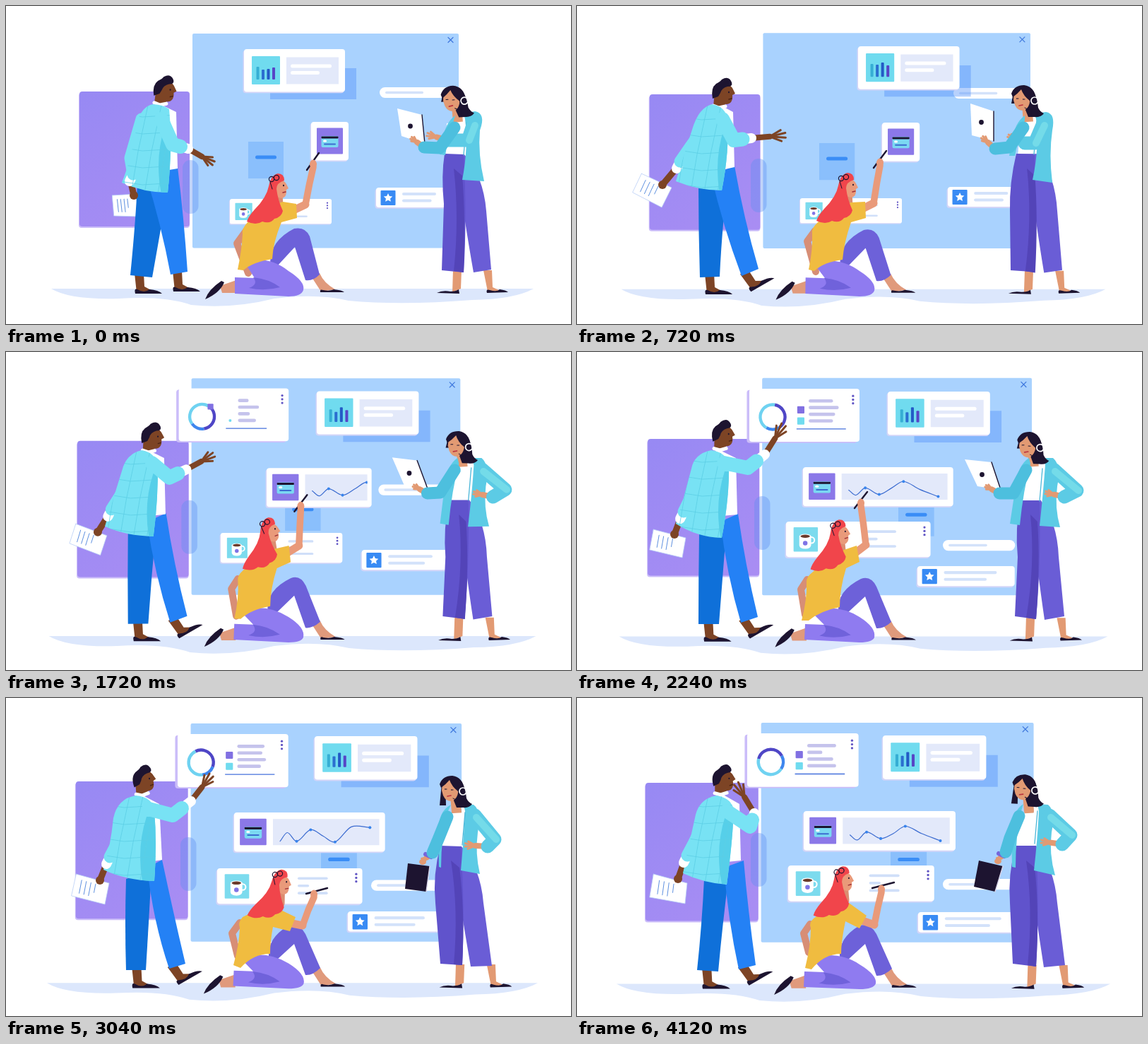
An HTML page with a canvas that plays this animation: 800 by 450 pixels, repeating every 4.16 s.

```html
<!DOCTYPE html>
<html lang="en">
<head>
<meta charset="utf-8">
<title>Team building a dashboard</title>
<style>
html, body { margin: 0; width: 100%; height: 100%; overflow: hidden; background: #fff; }
canvas { display: block; width: 800px; height: 450px; }
</style>
</head>
<body>
<canvas id="stage"></canvas>
<script>
const LOOP = 4160, STEP = 40;
const T = [0, 720, 1240, 2240, 3040, 3600, 4120];
const NUM = /-?[\d.]+/g;
const canvas = document.getElementById('stage');
const c = canvas.getContext('2d');
const dpr = window.devicePixelRatio || 1;
canvas.width = 800 * dpr;
canvas.height = 450 * dpr;
let t = 0, zoom = 1;

const WHITE = '#fff', DARK = '#1d1430', INK = '#e3e9fa', BROWN = '#7d4425';
const CYAN = '#78e2f4', TEAL = '#5ccbe5', SKIN = '#e99a7a', TAN = '#e29a73';

// Keys line up with T; gaps are bridged by a smooth curve that never overshoots.
const nums = s => s.match(NUM).map(Number);
function at(keys) {
  const ks = [];
  keys.forEach((k, i) => ks.push([T[i], nums(k)]));
  const last = ks.length - 1, j = ks.findIndex(k => k[0] > t) - 1;
  if (j < 0) return ks[last][1];
  const rate = (i, n) => (ks[i + 1][1][n] - ks[i][1][n]) / (ks[i + 1][0] - ks[i][0]);
  const slope = (i, n) => {
    if (i === 0) return rate(0, n);
    if (i === last) return rate(last - 1, n);
    const a = rate(i - 1, n), b = rate(i, n);
    return a * b > 0 ? 2 * a * b / (a + b) : 0;
  };
  const [[t0, from], [t1, to]] = [ks[j], ks[j + 1]];
  const d = t1 - t0, k = (t - t0) / d, e = k * k * (3 - 2 * k);
  return from.map((v, n) => v + (to[n] - v) * e
    + d * k * (1 - k) * ((1 - k) * slope(j, n) - k * slope(j + 1, n)));
}
function ramp(from, to) {
  const k = Math.min(1, Math.max(0, (t - from) / (to - from)));
  return k * k * (3 - 2 * k);
}
function morph(keys) {
  const v = at(keys);
  let i = 0;
  return new Path2D(keys[0].replace(NUM, () => v[i++].toFixed(2)));
}
function fill(color, path) {
  c.fillStyle = color;
  c.fill(typeof path === 'string' ? new Path2D(path) : path);
}
const shape = (color, keys) => fill(color, morph(keys));

function rect(x, y, w, h, color, r = 0) {
  if (w <= 0) return;
  c.fillStyle = color;
  c.beginPath();
  c.roundRect(x, y, w, h, r);
  c.fill();
}
function oval(x, y, rx, ry, color) {
  c.fillStyle = color;
  c.beginPath();
  c.ellipse(x, y, rx, ry, 0, 0, 7);
  c.fill();
}
const pill = (x, y, w, h, color) => rect(x, y - h / 2, w, h, color, h / 2);
function line(color, width, ...p) {
  c.strokeStyle = color;
  c.lineWidth = width;
  c.lineCap = c.lineJoin = 'round';
  c.beginPath();
  for (let i = 0; i < p.length; i += 2) c.lineTo(p[i], p[i + 1]);
  c.stroke();
}
function ring(x, y, r, color, width, a = 0, b = 7) {
  c.strokeStyle = color;
  c.lineWidth = width;
  c.lineCap = 'butt';
  c.beginPath();
  c.arc(x, y, r, a, b);
  c.stroke();
}
function group(x, y, scale, degrees, draw) {
  c.save();
  c.translate(x, y);
  c.scale(scale, scale);
  c.rotate(degrees * Math.PI / 180);
  draw();
  c.restore();
}
function zoomed(draw) {
  c.save();
  c.translate(405, 208);
  c.scale(zoom, zoom);
  c.translate(-405, -208);
  draw();
  c.restore();
}
function card(w, h, edge = '#d3d5f8', dx = 1.5) {
  rect(-dx, 1.8, w, h, edge, 4);
  rect(0, 0, w, h, WHITE, 4);
}
function dots(x, y) {
  for (let i = 0; i < 3; i++) oval(x, y + i * 5.2, 1.6, 1.6, '#6054c4');
}
function hand(x, y, tx, ty, color) {
  const dx = tx - x, dy = ty - y, len = Math.hypot(dx, dy), a = Math.atan2(dy, dx);
  const px = x + dx * .55, py = y + dy * .55;
  line(color, 8, x, y, px, py);
  for (let i = 0; i < 4; i++) {
    const b = a - .45 + i * .3, r = len * (.38 + (i % 3 ? .1 : 0));
    line(color, 3, px, py, px + Math.cos(b) * r, py + Math.sin(b) * r);
  }
}
const eye = (x, y) => oval(x, y, 1, 1.2, DARK);

function backdrop() {
  zoomed(() => {
    fill('#dce7fc', 'M64 400H747Q720 415 660 416Q560 424 485 417Q440 406 380 414Q320 429 262 423Q225 410 160 414Q90 416 64 400Z');
  });
  const [py] = at(['121', '125', '127', '123', '118', '118', '120']);
  const [px] = at(['104', , , , , , '97']);
  group(px, py, zoom, 0, () => {
    rect(-1, 2, 157, 191, '#cbbdf9', 4);
    const g = c.createLinearGradient(0, 0, 150, 190);
    g.addColorStop(0, '#9789f3');
    g.addColorStop(1, '#a98df3');
    rect(0, 0, 156, 191, g, 4);
  });
  zoomed(() => {
    rect(264, 39, 377, 303.5, '#a9d2fe', 2);
    line('#3f78dd', 1.2, 626, 44.5, 633, 51.5);
    line('#3f78dd', 1.2, 633, 44.5, 626, 51.5);
  });
  const [ox, oy] = at(['250 218', '246 216', '246 214', '251 204', '247 197', '247 193', '246 191']);
  rect(ox, oy, 22.5, 76, 'rgba(96,142,238,.38)', 11);
}

function note() {
  const [x, y] = at(['343 192', '343 194', '342 194', '455 208', '446 206', '446 206', '444 206']);
  group(x, y, zoom, 0, () => {
    rect(0, 0, 50, 52, '#8abffc');
    pill(10, 22, 30, 5, '#3a8df6');
  });
}

function bars() {
  const [x, y] = at(['337 61', '398 57', '440 55', '440 56', '437 54', '435 53', '433 53']);
  const hs = at(['18 14 15 17', '18 17 20 16', '17 14 20 17', '18 14 21 16', '18 15 20 16', '17 15 19 16', '17 15 20 17']);
  group(x, y, zoom, 0, () => {
    rect(37, 27, 122, 44, 'rgba(76,140,247,.4)');
    card(143, 60.5);
    rect(11, 10, 40, 40, '#70dbef', 1);
    hs.forEach((h, i) => rect(17.5 + i * 7.5, 43 - h, 4, h, ['#36aed4', '#2b6fd0', '#235bc6', '#5745c6'][i], 1));
    rect(60, 11.5, 74, 38, INK);
    pill(66, 24, 58, 5, WHITE);
    pill(66, 33.5, 41, 5, WHITE);
  });
}

function search() {
  const [x, y] = at(['529 115', '533 116', '535 117', '518 266', '517 257.5', '517 257', '518 256']);
  group(x, y, zoom, 0, () => {
    pill(0, 7.5, 101, 15, WHITE);
    pill(8, 7.5, 54, 3.5, '#d3e2fa');
  });
}

function star() {
  const [x, y, w] = at(['524 257 48', '525 256 48', '524 258 50', '482 303 74', '484 302 70', '484 302 76', '483 303 78']);
  group(x, y, zoom, 0, () => {
    card(136, 28);
    rect(6.5, 4, 21, 21, '#398bf4', 1);
    const p = [];
    for (let i = 0; i < 10; i++) {
      const a = -Math.PI / 2 + i * Math.PI / 5, r = i % 2 ? 3.2 : 6.6;
      p.push((17 + r * Math.cos(a)).toFixed(2) + ' ' + (14.5 + r * Math.sin(a)).toFixed(2));
    }
    fill(WHITE, 'M' + p.join('L') + 'Z');
    pill(37, 9, w, 4, '#d3e2fa');
    pill(37, 18.5, w * .7 + 8, 4, '#d3e2fa');
  });
}

function curve() {
  const xs = [64, 74, 87, 106.5, 124, 140.5, 163, 189];
  const wave = '32 39 29 38 29 20 31 41';
  const ys = at([wave, , , wave, '40 28 40 24 33 41 20 21', '38 40 30 36 21 34 37 18', '33 40 29 38 31 21 31 41']);
  const slope = i => {
    const a = Math.max(0, i - 1), b = Math.min(7, i + 1);
    return (ys[b] - ys[a]) / (xs[b] - xs[a]);
  };
  c.strokeStyle = '#3c6cd0';
  c.lineWidth = 1.2;
  c.beginPath();
  c.moveTo(xs[0], ys[0]);
  for (let i = 1; i < 8; i++) {
    const d = (xs[i] - xs[i - 1]) / 3;
    c.bezierCurveTo(xs[i - 1] + d, ys[i - 1] + slope(i - 1) * d, xs[i] - d, ys[i] - slope(i) * d, xs[i], ys[i]);
  }
  c.stroke();
  for (const i of [2, 3, 5, 7]) oval(xs[i], ys[i], 2, 2, '#3884ec');
}

function payment() {
  const [x, y, w] = at(['432 164 53', '432 165 53', '421 165 75.5', '320 163 210', '323 162 210', '324 160 210', '321 160 210']);
  group(x, y, zoom, 0, () => {
    card(w, 54.5);
    c.save();
    c.beginPath();
    c.rect(0, 0, w - 6, 54.5);
    c.clip();
    if (t > 1300) {
      rect(54, 9, 148, 36.5, INK);
      curve();
    }
    c.restore();
    rect(8, 8.5, 37, 37, '#8b78e8', 1);
    rect(14.5, 20, 24, 16, '#7bd8f2', 2);
    rect(14.5, 20.5, 24, 3, DARK, 1);
    pill(17, 27, 5, 3, WHITE);
    pill(18, 31.5, 17, 2, '#3c6cd0');
  });
}

function summary() {
  const grow = ramp(840, 1140);
  if (!grow) return;
  const [x, y] = at(['245 51', , '245 51', '244 52', '243 51', '242 50', '241 50']);
  group(x + 77 * (1 - grow), y + 37 * (1 - grow), zoom * grow, 0, () => {
    card(154, 74, '#cbbdf9', 3.5);
    dots(145, 10);
    const turn = -1.4 - (t - 2240) * .0008, r = 17.3 * ramp(1280, 1720);
    const arcs = [['#4f46c6', 0, 2.4], ['#3e86ee', 2.4, 3.5], ['#6fd2f1', 3.5, 6.29]];
    if (r) for (const [color, a, b] of arcs) ring(32.6, 39.5, r, color, 4.3, turn + a, turn + b);
    const [sx, sy, size, size2] = at(['29 22 0 0', '29 22 0 0', '26 20 6 0', '67 24.5 10 10']);
    rect(sx, sy, size, size, '#8170e2', 1);
    rect(72 - size2 / 2, 45 - size2 / 2, size2, size2, '#70dbef', 1);
    at(['0 0 0 0', '0 0 0 0', '0 12 0 12', '34 42 37 34', '38 35 40 33', '39 25 36 36', '40 21 36 40'])
      .forEach((w, i) => pill(83, 17 + i * 9.3, w, 4.6, '#c5c3ec'));
    const [w] = at(['0', '0', '43', '69']);
    rect(66, 55.5, w, 1.3, '#4470dc');
  });
}

function coffee() {
  const [x, y, k] = at(['317 273 .713', '316 272 .71', '313 271 .708', '296 240 1', '299 241 1', '299 239 1', '299 237 1']);
  group(x, y, zoom * k, 0, () => {
    card(202, 49.5);
    dots(193.5, 8);
    rect(10.5, 8, 34, 34, '#7cdbee', 1);
    ring(35.5, 26, 4.2, WHITE, 2);
    fill(WHITE, 'M18.5 20H35V33Q34 38 27 38Q19 38 18.5 33Z');
    oval(26.8, 20.5, 8.2, 3.3, WHITE);
    oval(26.8, 20.5, 6.6, 2.2, '#6b3a2a');
    oval(26.8, 30, 3.2, 3.2, '#7f74e6');
    [42, 16, 42].forEach((w, i) => pill(112, 14 + i * 10.3, w, 3.6, '#d0dff9'));
  });
}

function manFoot(x, y, turn) {
  group(x, y, zoom, turn, () => {
    fill(BROWN, 'M0 -4H13L14 15L25 21L3 24Z');
    fill(DARK, 'M1 25Q-1 17 4 19Q14 25 21 19Q34 20 39 25Z');
  });
}

function man() {
  const sheet = at(['150 268 184 266 188 298 153 297', '91 237 134 257 120 285 79 264', '90 236 133 257 120 285 79 263',
    '108 251 154 263 149 291 103 280', '99 249 146 262 140 292 93 280', '107 243 149 259 136 289 95 273', '108 249 156 262 153 291 103 282']);
  const on = (u, v) => [0, 1].map(i => (1 - v) * ((1 - u) * sheet[i] + u * sheet[2 + i]) + v * ((1 - u) * sheet[6 + i] + u * sheet[4 + i]));
  const back = at(['192 160 176 215 176 246 181 268', '190 158 160 200 142 228 121 253', '192 157 162 200 143 228 122 252',
    '182 160 160 208 147 234 138 258', '174 160 156 208 143 233 133 258', '192 158 168 202 153 228 137 252', '188 160 164 208 152 231 143 256']);
  const front = at(['220 160 236 196 258 202 293 222', '206 160 222 190 247 187 294 183', '206 158 222 190 246 186 294 183',
    '208 157 242 164 266 145 292 104', '202 157 236 166 262 146 290 110', '215 160 248 184 254 165 236 116', '212 160 245 182 251 163 226 122']);

  c.beginPath();
  for (const p of [on(0, 0), on(1, 0), on(1, 1), on(0, 1)]) c.lineTo(...p);
  c.closePath();
  c.fillStyle = WHITE;
  c.fill();
  c.strokeStyle = '#b9cff6';
  c.lineWidth = .8;
  c.stroke();
  for (let i = 0; i < 4; i++) {
    const u = .2 + i * .14;
    line('#4b83dc', .9, ...on(u, .2), ...on(u, i === 3 ? .6 : .8));
  }

  manFoot(...at(['182 382 0', '181 383 0', , , , , '177 386 0']));
  manFoot(...at(['236 379 0', '233 383 -30', , , , , '230 385 -30']));
  shape('#0f70d9', ['M186 250L232 240Q222 300 207 384L176 381Q184 300 186 250Z', 'M172 255L215 240Q206 300 202 383L174 384Q172 320 172 255Z', ,
    'M173 256L212 245Q206 320 201 385L172 385Q172 320 173 256Z', 'M170 256L206 245Q202 320 198 385L170 385Q168 320 170 256Z',
    'M178 256L215 250Q206 320 200 387L170 385Q176 320 178 256Z', 'M180 256L215 250Q206 320 200 387L170 385Q177 320 180 256Z']);
  shape('#2481f5', ['M198 240L243 228Q252 300 257 376L233 380Q220 310 198 240Z', 'M190 240L223 226Q236 300 257 372L233 382Q206 310 190 240Z', ,
    'M203 240L228 229Q238 300 256 375L232 383Q212 315 203 240Z', 'M200 240L221 229Q236 300 254 376L231 383Q208 315 200 240Z',
    'M208 240L236 230Q242 300 253 378L229 384Q214 315 208 240Z', 'M208 240L236 230Q242 300 253 378L229 384Q214 315 208 240Z']);
  shape(WHITE, ['M212 136L241 150L243 230L225 233Z', 'M195 136L221 150L223 228L205 232Z', , 'M196 136L225 150L227 230L205 232Z',
    'M190 136L217 150L221 229L203 232Z', 'M203 134L232 150L234 230L214 232Z', 'M202 134L230 150L232 230L212 232Z']);

  const head = at(['218 136 2', '201 140 0', '201 140 0', '202 135 -4', '192 134 -9', '204 133 -2', '203 133 -5']);
  group(head[0], head[1], 1, head[2], () => {
    fill(BROWN, 'M-6 -20H9L9 2Q0 8 -8 3Z');
    fill(BROWN, 'M-4 -28Q12 -34 19 -24L23 -16L19 -14Q20 -2 11 -1Q-6 -2 -5 -14Z');
    fill(DARK, 'M-9 -9Q-12 -24 -4 -30Q2 -33 4 -36Q14 -42 18 -32Q20 -26 12 -26Q4 -24 2 -17L-1 -12Z');
    eye(14, -18);
    line('#4a2214', 1.3, 14, -8, 18, -9);
    line(WHITE, 5, -8, 1, 0, 4, 9, 2);
  });

  const coat = morph(['M208 139Q192 142 186 165Q178 215 164 250Q195 264 229 264Q236 200 231 146Q224 140 208 139Z',
    'M191 139Q172 144 163 175Q150 215 140 248Q172 261 205 261Q216 205 213 160Q210 142 191 139Z',
    'M193 139Q172 144 165 172Q150 215 140 250Q172 259 212 259Q216 205 214 160Q210 142 193 139Z',
    'M190 139Q166 144 162 165Q152 205 140 243Q170 262 205 263Q216 205 215 160Q212 142 190 139Z',
    'M184 138Q158 142 152 170Q148 210 138 243Q170 258 210 259Q214 205 210 160Q208 140 184 138Z',
    'M200 136Q172 142 172 165Q166 210 159 248Q190 262 222 262Q226 205 226 160Q222 142 200 136Z',
    'M198 138Q174 142 168 165Q158 210 150 248Q180 262 212 264Q220 205 222 160Q220 142 198 138Z']);
  line(BROWN, 9, back[4], back[5], back[6], back[7]);
  oval(back[6], back[7], 6, 6, BROWN);
  fill(CYAN, coat);
  line(WHITE, 14, back[4] + 1, back[5] - 2, back[4] - 1, back[5] + 2);
  line(CYAN, 17, back[0], back[1], back[2], back[3], back[4] + 4, back[5] - 8);
  c.save();
  c.clip(coat);
  const [hx, hy] = head;
  fill('#56cfe9', `M${hx + 7} ${hy + 34}Q${hx - 8} ${hy + 80} ${hx + 2} ${hy + 130}H${hx + 20}V${hy + 34}Z`);
  for (let i = 0; i < 5; i++) {
    const y = hy + 16 + i * 24, x = hx - 50 + i * 19;
    line('#5ccfe5', .8, hx - 70, y - 2, hx - 25, y + 5, hx + 26, y + 2);
    line('#5ccfe5', .8, x + 15, hy, x, hy + 70, x - 10, hy + 130);
  }
  c.restore();
  hand(front[4], front[5], front[6], front[7], BROWN);
  line(WHITE, 14, (front[2] + 3 * front[4]) / 4, (front[3] + 3 * front[5]) / 4, front[4], front[5]);
  line(CYAN, 20, front[0], front[1], front[2], front[3], (front[2] + front[4]) / 2, (front[3] + front[5]) / 2);
}

function kneeler() {
  const body = ['M345 303Q365 285 392 277L411 280L412 300L390 306Q378 335 377 358Q350 362 336 374L328 373Q334 345 335 322Q333 315 345 303Z',
    'M342 305Q365 288 388 278L408 277L409 300L388 306Q378 335 376 359Q350 362 336 375L328 373Q334 345 333 322Q331 315 342 305Z',
    'M339 306Q362 288 385 278L406 274L407 298L386 306Q377 335 376 359Q350 362 336 376L328 374Q334 345 332 322Q330 315 339 306Z',
    'M333 312Q355 290 378 280L396 274L400 297L381 306Q372 335 372 361Q345 366 328 380L318 380Q326 350 325 325Q325 318 333 312Z',
    'M335 310Q360 296 385 298L410 310L402 330L378 324Q374 345 374 362Q350 362 332 382L322 378Q330 350 331 325Q328 318 335 310Z',
    'M335 310Q360 296 385 298L411 311L403 331L378 324Q374 345 374 362Q350 362 332 382L322 378Q330 350 331 325Q328 318 335 310Z',
    'M335 312Q360 292 385 290L410 308L400 326L380 316Q374 345 374 362Q350 362 332 384L323 382Q331 350 331 325Q328 318 335 312Z'];
  const rear = at(['340 318 327 336 343 378', '337 318 326 333 338 376', , '326 322 317 336 323 372', '331 318 320 333 328 365', , '330 320 321 333 328 360']);
  line('#d78e76', 10, ...rear);

  zoomed(() => {
    fill('#e09a7c', 'M326 388L303 396L306 406L326 406Z');
    fill(DARK, 'M282 415Q287 401 305 389L309 391Q303 406 282 415Z');
    fill('#e09a7c', 'M433 384L444 378Q450 392 466 401L446 404Z');
    fill(DARK, 'M445 405Q444 400 449 402Q458 404 464 401Q476 402 479 405Z');
  });
  shape('#6d61d9', ['M374 364Q374 332 408 315Q424 312 430 326L444 380Q434 390 424 388L409 341L384 368Z', , ,
    'M370 366Q368 338 402 321Q416 316 424 332L445 382Q434 392 424 391L408 346L382 370Z', 'M372 366Q370 340 400 322Q416 318 424 334L445 382Q434 393 424 392L408 348L384 370Z', ,
    'M372 366Q370 340 400 322Q416 318 424 334L446 383Q434 394 424 393L408 348L384 370Z']);
  shape('#8f7bf0', ['M336 360Q375 354 400 375Q424 390 421 402Q418 411 400 411L324 407L324 384L352 385Z', , ,
    'M330 366Q370 356 400 375Q424 390 421 404Q418 411 400 411L322 407L323 385L350 386Z', , , 'M331 367Q372 358 400 377Q425 392 423 404Q420 412 400 412L321 409L322 387L350 388Z']);
  zoomed(() => fill('#7062db', 'M350 384Q372 386 388 398Q366 404 344 399Q358 394 350 384Z'));

  const arm = at(['405 290 424 281 435 224', '402 288 420 279 429 222', '399 287 420 276 431 222', '392 286 409 273 402 214',
    '400 318 420 322 436 278', '401 320 421 325 437 273', '401 314 421 321 431 271']);
  const pen = at(['426 232 443 208', '420 229 438 205', '422 230 440 206', '393 221 411 198', '425 277 455 269', '422 272 453 264', '418 269 449 261']);
  const head = at(['390 257 0', '388 256 0', '381 252 -8', '377 257 -3', '394 263 4', '392 264 3', '382 258 -2']);
  line(SKIN, 11, ...arm.slice(0, 4));
  line(SKIN, 9.5, arm[2], arm[3], (arm[2] + arm[4]) / 2, (arm[3] + arm[5]) / 2, arm[4], arm[5] + 4);
  line(DARK, 2.4, ...pen);
  oval(arm[4], arm[5], 5, 6.5, SKIN);
  group(head[0], head[1], 1, head[2], () => line('#db8d70', 11, -4, 8, -3, 28));
  shape('#f0bc40', body);
  group(head[0], head[1], 1, head[2], () => {
    fill(SKIN, 'M-9 -9Q2 -14 7 -5L10 1L7 3Q8 14 0 15Q-10 14 -10 0Z');
    fill('#f1454b', 'M4 -10Q4 -20 -5 -20Q-15 -18 -18 -2Q-21 14 -38 31Q-47 41 -49 48Q-36 54 -27 48Q-16 52 -10 44Q0 42 2 33Q-5 18 -7 2Q-7 -7 4 -10Z');
    ring(-14, -12, 3.6, DARK, 1.2);
    ring(-7, -14, 3.6, DARK, 1.2);
    line(DARK, 1, -16, -8, -13, 2);
    eye(3, -3);
    line('#9e2f37', 1.4, 2, 7, 6, 6);
  });
}

function presenter() {
  const left = at(['635 172 614 201 592 200 574 187', '632 172 612 200 592 202 574 186', '634 167 612 198 595 200 576 189', '636 167 618 200 598 200 579 190',
    '625 168 612 200 604 219 589 231', '624 167 612 198 605 218 592 231', '626 167 613 198 607 218 595 230']);
  const right = at(['662 166 654 190 626 190 597 182', '660 166 648 194 634 194 611 184', '672 166 704 194 688 205 660 200', '675 166 708 196 690 205 664 199',
    '664 166 692 200 682 210 651 208', '665 166 692 200 681 211 651 207', '669 166 699 194 687 207 658 203']);
  const pad = at(['554 145 589 154 593 195 560 184', '557 138 590 149 590 191 559 183', '546 147 580 152 593 193 560 187', '549 152 587 156 600 195 567 190',
    '569 234 600 238 595 274 565 270', '568 230 598 236 591 273 560 268', '569 230 603 238 592 274 562 267']);
  const head = at(['631 133 -3', '630 132 0', '637 131 2', '638 133 2', '629 130 0', '629 128 0', '631 128 3']);
  const [lock] = at(['2', '6', '4', '4', '22']);
  const raised = t < 2660;

  zoomed(() => {
    fill(TAN, 'M633 374H645L644 400L632 405Z');
    fill(DARK, 'M610 406Q618 402 629 404Q637 404 641 401L642 407Z');
    fill(TAN, 'M676 374H688L689 398L700 403L682 404Z');
    fill(DARK, 'M681 406Q679 400 685 402Q695 405 699 401Q708 402 711 405Z');
  });
  shape('#6a5dd6', ['M636 209L648 209Q676 240 680 290L687 373L662 377Q650 310 636 209Z', , 'M638 209L655 209Q678 240 680 290L687 374L661 378Q650 310 638 209Z',
    'M640 209L656 209Q680 240 682 290L690 374L662 379Q652 310 640 209Z', 'M630 209L644 209Q672 240 676 290L688 379L658 380Q646 310 630 209Z', ,
    'M636 209L650 209Q676 240 680 290L691 378L661 381Q650 310 636 209Z']);
  shape('#6053cc', ['M621 209Q616 240 620 280L617 374L648 377Q653 300 648 209Z', 'M622 209Q612 250 613 290L614 374L643 376Q648 300 648 209Z', 'M626 209Q617 250 619 290L616 374L648 377Q655 300 654 209Z',
    'M628 209Q620 250 624 290L620 374L650 378Q657 300 655 209Z', 'M615 209Q604 250 608 290L615 376L646 378Q650 300 644 209Z', ,
    'M621 209Q610 250 613 290L617 376L650 380Q655 300 650 209Z']);
  shape('#5344b8', ['M634 230Q642 300 634 375L648 377Q651 300 646 240Z', , , 'M642 230Q649 300 636 376L650 378Q656 300 652 240Z',
    'M630 230Q641 300 634 377L646 378Q650 300 642 240Z', , 'M636 230Q646 300 638 378L650 380Q655 300 648 240Z']);

  line(TAN, 14, head[0] + 7, head[1] + 8, head[0] + 9, head[1] + 32);
  shape(WHITE, ['M624 166L652 163L648 210L622 209Z', , 'M630 164L661 162L655 209L626 209Z', 'M633 163L663 161L656 210L628 210Z',
    'M617 164L650 162L645 210L615 209Z', , 'M621 164L655 162L650 209L621 209Z']);
  shape(TEAL, ['M636 155Q622 165 618 190L614 210L622 211Q626 185 634 162Z', 'M634 155Q620 165 616 190L612 212L620 212Q626 185 634 162Z', 'M638 150Q624 160 621 190L616 242L626 244Q630 195 640 158Z',
    'M640 150Q624 160 621 190L613 243L627 245Q632 195 642 158Z', 'M630 151Q612 160 612 190L613 239L616 240Q616 195 626 160Z', , 'M632 150Q616 160 615 190L616 239L621 240Q621 195 629 160Z']);
  shape(TEAL, ['M648 152L664 149Q680 152 671 176Q668 210 677 248L646 246Q655 200 650 160Z', 'M648 152L664 150Q678 152 673 176Q668 210 673 250L645 246Q655 200 650 160Z', 'M658 150L672 150Q684 160 678 190Q676 220 684 246L652 248Q660 200 661 160Z',
    'M660 150L674 150Q686 160 680 190Q676 220 684 248L655 246Q660 200 663 160Z', 'M648 151L662 151Q674 160 668 190Q664 220 671 249L644 244Q648 200 650 160Z', ,
    'M652 150L667 151Q678 160 672 190Q668 220 677 251L647 244Q652 200 654 160Z']);
  line('#4bb6d8', 1.3, head[0] + 21, head[1] + 32, head[0] + 17, head[1] + 78);

  hand(right[4], right[5], right[6], right[7], TAN);
  line(TEAL, 19, ...right.slice(0, 6));
  line('#74dbe9', 10, right[0] + 2, right[1] + 3, right[2] + 2, right[3]);

  const [x1, y1, x2, y2, x3, y3, x4, y4] = pad;
  if (!raised) hand(left[4], left[5], left[6], left[7], TAN);
  fill(raised ? WHITE : DARK, `M${x1} ${y1}L${x2} ${y2}L${x3} ${y3}L${x4} ${y4}Z`);
  line(raised ? DARK : '#d9d5ea', 1.4, x2, y2, x3, y3);
  if (raised) {
    oval((x1 + x3) / 2 - 1, (y1 + y3) / 2, 3.4, 3.4, DARK);
    hand(left[4], left[5], left[6], left[7], TAN);
  } else {
    oval(left[6] + 1, left[7] + 1, 5, 4, TAN);
    line('#7566da', 6, left[4] - 10, left[5] + 2, left[4] - 2, left[5] + 6);
  }
  line('#4dbfde', 17, ...left.slice(0, 6));

  group(head[0], head[1], 1, head[2], () => {
    fill(DARK, `M-12 -10L-7 -10L-6 ${lock}L-15 ${lock}Z`);
    fill(DARK, 'M-6 -12H16Q22 -2 23 12Q26 18 31 20Q27 26 18 25H9Z');
    fill(TAN, 'M-11 -12Q0 -18 11 -10Q14 10 3 16Q-6 17 -10 8L-12 1Z');
    fill(DARK, 'M-15 -8Q-11 -20 3 -20Q18 -18 20 0L22 24H13Q14 10 11 2Q2 -5 -1 -14Q-6 -8 -13 -3Z');
    ring(18, 2, 5, WHITE, 1.7);
    line(DARK, 1, -8, -1, -5, -1);
    line(DARK, 1, 1, 0, 4, 0);
    line('#bb343f', 1.7, -4, 9, 1, 8);
    line(DARK, 1, 16, 9, 10, 15, 4, 12);
  });
}

function draw(now) {
  t = Math.floor((now % LOOP) / STEP) * STEP;
  zoom = 1 + .0236 * t / 4120;
  c.setTransform(dpr, 0, 0, dpr, 0, 0);
  c.fillStyle = WHITE;
  c.fillRect(0, 0, 800, 450);
  for (const part of [backdrop, note, search, bars, star, payment, summary, coffee, man, kneeler, presenter]) part();
}

const start = performance.now();
function tick() {
  draw(performance.now() - start);
  requestAnimationFrame(tick);
}
tick();
</script>
</body>
</html>
```
